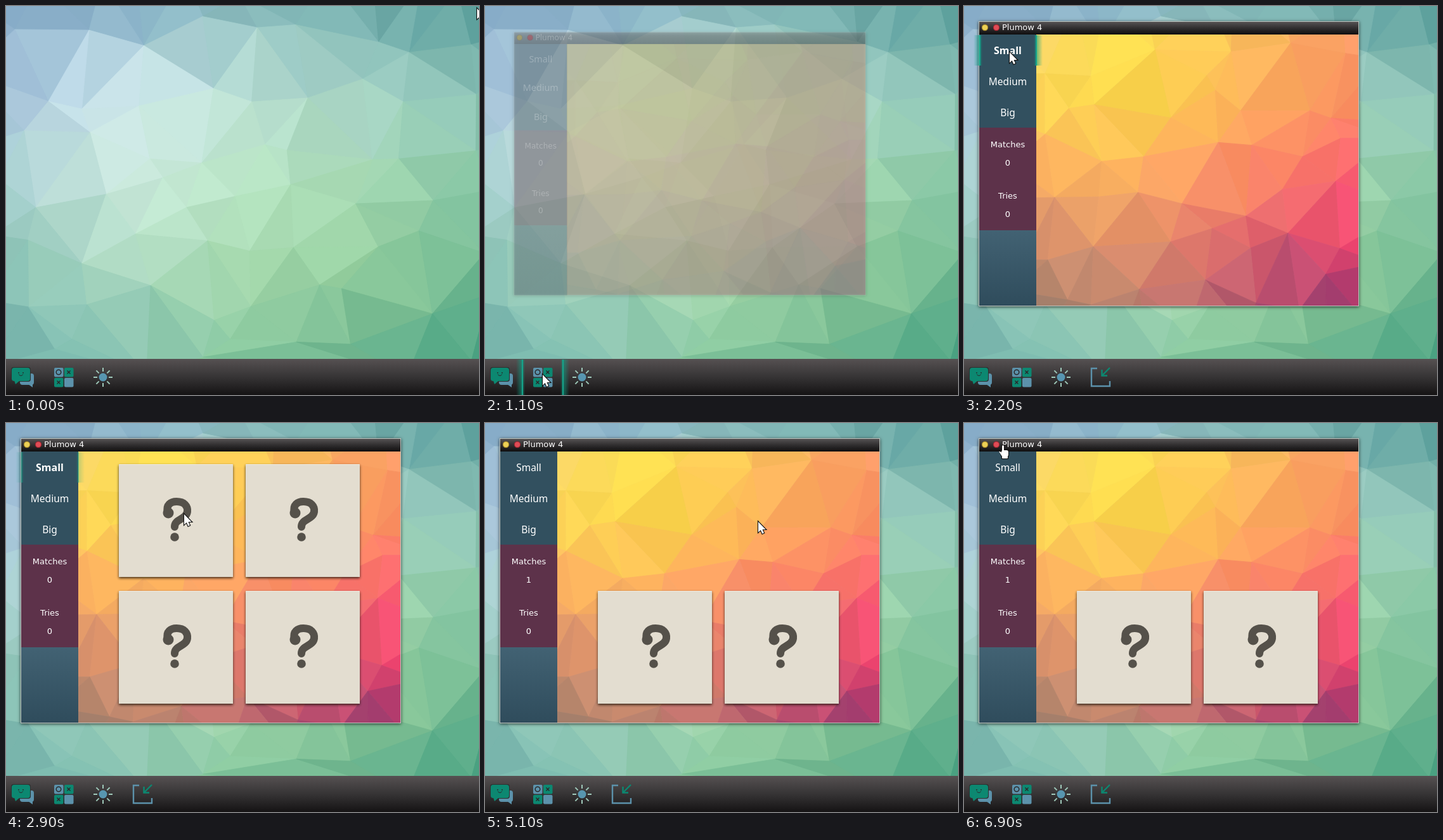
Write an HTML page with a canvas that moves like this. It is 746 px wide and 614 px high and loops after 7.2 s.

```html
<!DOCTYPE html>
<html lang="en">
<head>
<meta charset="utf-8">
<title>Card game on a desktop</title>
<style>
html, body { margin: 0; width: 100%; height: 100%; overflow: hidden; background: #222; }
canvas { display: block; }
</style>
</head>
<body>
<canvas id="stage" width="746" height="614"></canvas>
<script>
const LOOP = 7200, TAU = Math.PI * 2;
const GREEN = '#0c8871', BLUE = '#5c92ab', INK = '#2a292b', MARK = '#55514a';
let g = document.getElementById('stage').getContext('2d');

const clamp = v => Math.max(0, Math.min(1, v));
const mix = (a, b, k) => a + (b - a) * k;
const ramp = (t, a, b) => clamp((t - a) / (b - a));
const smooth = v => v * v * (3 - 2 * v);
const ease = (t, a, b) => smooth(ramp(t, a, b));

function random(seed) {
  return () => (seed = (seed * 16807) % 2147483647) / 2147483647;
}

// Runs a painter on a fresh canvas and returns that canvas.
function cache(w, h, paint) {
  const c = document.createElement('canvas'), old = g;
  c.width = w;
  c.height = h;
  g = c.getContext('2d');
  paint();
  g = old;
  return c;
}

function path(pts, close) {
  g.beginPath();
  for (let i = 0; i < pts.length; i += 2) g.lineTo(pts[i], pts[i + 1]);
  if (close) g.closePath();
}
function ink(color, width) {
  g.strokeStyle = color;
  g.lineWidth = width;
  g.stroke();
}
function line(pts, color, width) {
  path(pts);
  ink(color, width);
}
function poly(pts, color) {
  path(pts, true);
  g.fillStyle = color;
  g.fill();
}
function rect(x, y, w, h, color) {
  g.fillStyle = color;
  g.fillRect(x, y, w, h);
}
function round(x, y, w, h, r, color) {
  g.beginPath();
  g.roundRect(x, y, w, h, r);
  g.fillStyle = color;
  g.fill();
}
function arc(x, y, r, from = 0, to = TAU) {
  g.beginPath();
  g.arc(x, y, r, from, to);
}
function disc(x, y, r, color) {
  arc(x, y, r);
  g.fillStyle = color;
  g.fill();
}
function shadow(color, blur, dy) {
  g.shadowColor = color;
  g.shadowBlur = blur;
  g.shadowOffsetY = dy;
}
function fade(x0, y0, x1, y1, ...colors) {
  const f = g.createLinearGradient(x0, y0, x1, y1);
  colors.forEach((c, i) => f.addColorStop(i / (colors.length - 1), c));
  return f;
}
function text(str, x, y, font, align = 'center') {
  g.font = font;
  g.textAlign = align;
  g.fillStyle = '#fff';
  g.fillText(str, x, y);
}

// Low-poly picture: Delaunay triangles over a jittered grid, tinted by key colours.
function mesh(w, h, cell, keys, seed) {
  const grid = keys.map(r => r.split(' ').map(c => [0, 2, 4].map(i => parseInt(c.substr(i, 2), 16))));
  const rnd = random(seed), p = [];
  for (let y = -cell / 2; y < h + cell; y += cell)
    for (let x = -cell / 2; x < w + cell; x += cell)
      p.push([x + (rnd() - 0.5) * cell * 0.8, y + (rnd() - 0.5) * cell * 0.8]);

  function tint(x, y) {
    const u = clamp(x / w) * (grid[0].length - 1), v = clamp(y / h) * (grid.length - 1);
    const i = Math.min(Math.floor(u), grid[0].length - 2), j = Math.min(Math.floor(v), grid.length - 2);
    const light = (rnd() - 0.5) * 11;
    const channel = k => light + mix(
      mix(grid[j][i][k], grid[j][i + 1][k], u - i),
      mix(grid[j + 1][i][k], grid[j + 1][i + 1][k], u - i), v - j);
    return `rgb(${[0, 1, 2].map(k => Math.round(channel(k)))})`;
  }

  function face(a, b, c) {
    const d = 2 * (a[0] * (b[1] - c[1]) + b[0] * (c[1] - a[1]) + c[0] * (a[1] - b[1]));
    if (Math.abs(d) < 1) return;
    const [A, B, C] = [a, b, c].map(q => q[0] * q[0] + q[1] * q[1]);
    const ox = (A * (b[1] - c[1]) + B * (c[1] - a[1]) + C * (a[1] - b[1])) / d;
    const oy = (A * (c[0] - b[0]) + B * (a[0] - c[0]) + C * (b[0] - a[0])) / d;
    const r = (a[0] - ox) ** 2 + (a[1] - oy) ** 2 - 0.01;
    if (p.some(q => (q[0] - ox) ** 2 + (q[1] - oy) ** 2 < r)) return;
    const color = tint((a[0] + b[0] + c[0]) / 3, (a[1] + b[1] + c[1]) / 3);
    poly([...a, ...b, ...c], color);
    ink(color, 0.8);
  }

  return cache(w, h, () => {
    for (let i = 0; i < p.length; i++)
      for (let j = i + 1; j < p.length; j++)
        for (let k = j + 1; k < p.length; k++) face(p[i], p[j], p[k]);
  });
}

const desktop = mesh(746, 557, 86, [
  '86abc8 8eb6cc 86b8ba 74aeac 559a98',
  'acc9df d4ecf0 bfe3d8 a8d4c8 8cc2b6',
  'a8d0d0 cceade bae6c6 a6d9b2 86c6a4',
  '8ec6b8 b2dec6 a6daae 94cf9e 70b892',
  '70aea8 86c4b2 88c89e 6cb48e 46a080'
], 71);

const wallpaper = mesh(508, 428, 74, [
  'fcd966 fcdf52 fdcf58 fcb162 fc9c68',
  'fcd555 fcda4a fcc152 fca75e fd9063',
  'fcb062 fcb45c fd9c64 fd8468 fb5f72',
  'da936e e2946a e2786a e05a70 f24873',
  'a88470 b8806c c26c6c a84a70 a63e72'
], 29);

// Card faces are drawn around their own centre.
function mark() {
  g.lineCap = 'round';
  g.beginPath();
  g.moveTo(-13, -13);
  g.bezierCurveTo(-16, -25, -8, -30, 1, -30);
  g.bezierCurveTo(13, -30, 19, -23, 18, -14);
  g.bezierCurveTo(16, -1, -2, -3, -2, 10);
  ink(MARK, 12);
  disc(-12, -12, 8.5, MARK);
  disc(-2, 26, 6.8, MARK);
}

function leaf(angle, start, len, width) {
  const top = [], low = [];
  for (let i = 0; i <= 10; i++) {
    const half = width * Math.sin(Math.PI * (0.15 + i * 0.085)) * (i % 2 ? 0.5 : 1);
    const x = len * i / 10 + (i % 2 ? 0 : 4);
    top.push(x, -half);
    low.unshift(half);
    low.unshift(x);
  }
  g.save();
  g.rotate(angle);
  g.translate(start, 0);
  poly([...top, ...low], '#cfc7bc');
  ink(INK, 2);
  line([0, 0, len, 0], INK, 2);
  for (let i = 0; i < 12; i++) {
    const x = len * i / 13, h = width * 0.7 * Math.sin(Math.PI * (i + 1) / 14);
    line([x + 6, -h, x, 0, x + 6, h], INK, 1);
  }
  g.restore();
}

function petal(angle, rx, ry, size, rnd) {
  const sx = Math.cos(angle) * rx, sy = Math.sin(angle) * ry;
  g.save();
  g.translate(3 + sx, -18 + sy);
  g.rotate(Math.atan2(sy, sx));
  const pts = [];
  for (let i = 0; i < 22; i++) {
    const a = i / 22 * TAU, r = size * (0.9 + rnd() * 0.2);
    pts.push(Math.cos(a) * r * 0.8, Math.sin(a) * r);
  }
  poly(pts, '#d8d0c4');
  ink(INK, 1.7);
  for (let i = -5; i <= 5; i++) {
    const y = i / 6 * size;
    line([-size * 0.6, y * 0.5, size * (0.1 + rnd() * 0.4), y * 0.85], INK, 0.8);
  }
  g.restore();
}

function flower() {
  const rnd = random(97);
  g.lineJoin = 'round';
  g.save();
  g.translate(3, -18);
  leaf(3.1, 34, 44, 14);
  leaf(2.4, 34, 48, 16);
  leaf(1.05, 34, 58, 15);
  leaf(0.6, 34, 46, 15);
  g.restore();
  for (let ring = 0; ring < 4; ring++) {
    const spread = 1 - ring * 0.26, count = 9 - ring;
    for (let i = 0; i < count; i++)
      petal(i / count * TAU + ring * 0.5, 38 * spread, 28 * spread, 17 - ring * 3, rnd);
  }
}

function face(color, art) {
  return {
    color,
    art: cache(176, 174, () => {
      rect(0, 0, 176, 174, color);
      g.translate(88, 87);
      art();
    })
  };
}
const back = face('#e3ddd0', mark), front = face('#e6dfd5', flower);

// A card at centre x, y; turn 0 shows the back, 1 the front. It recedes while it turns.
function card(x, y, turn) {
  const side = turn < 0.5 ? back : front;
  const a = Math.PI * (turn < 0.5 ? turn : turn - 1);
  const depth = 1300, lift = Math.sin(Math.PI * turn);
  const project = u => {
    const k = depth / (depth + u * Math.sin(a) + 134 * lift);
    return [x + u * Math.cos(a) * k, k];
  };
  const [x0, k0] = project(-90), [x1, k1] = project(90);
  shadow(`rgba(30,20,10,${mix(0.85, 0.6, lift)})`, mix(4, 16, lift), 2);
  path([x0, y - 89 * k0, x1, y - 89 * k1, x1, y + 89 * k1, x0, y + 89 * k0], true);
  g.fillStyle = side.color;
  g.fill();
  shadow('transparent', 0, 0);
  line([x0 + 1, y - 88.5 * k0, x1 - 1, y - 88.5 * k1], '#f0ebe1', 1);
  if (!turn || turn === 1) return g.drawImage(side.art, x - 88, y - 87);
  for (let i = 0; i < 176; i++) {
    const [left, k] = project(i - 88), [right] = project(i - 87);
    g.drawImage(side.art, i, 0, 1, 174, left, y - 87 * k, right - left + 0.5, 174 * k);
  }
}

function glow(x0, x1, y, h, alpha) {
  if (alpha <= 0) return;
  g.save();
  g.globalAlpha = alpha;
  for (const [x, dir] of [[x0, -1], [x1, 1]]) {
    for (const reach of [10, -4]) {
      const end = x + dir * reach;
      rect(Math.min(x, end), y, Math.abs(reach), h, fade(x, 0, end, 0, 'rgba(12,160,132,.65)', 'rgba(12,160,132,0)'));
    }
    rect(x - 1, y, 2, h, '#16a48b');
  }
  g.restore();
}

function chatIcon() {
  round(22, 580, 22, 18, 4, BLUE);
  poly([35, 597, 42, 597, 42, 602], BLUE);
  round(8, 570, 31, 23, 4, '#302f30');
  round(9, 571, 29, 21, 4, GREEN);
  poly([13, 591, 22, 591, 15, 597], GREEN);
  disc(20, 579, 0.9, INK);
  disc(27, 579, 0.9, INK);
  arc(23.5, 580, 3.5, 0.4, 2.74);
  ink(INK, 1);
}

function gameIcon() {
  for (let i = 0; i < 4; i++) {
    const x = 76 + (i % 2) * 16, y = 571 + (i >> 1) * 16, cx = x + 7, cy = y + 7;
    const cross = i === 1 || i === 2;
    round(x, y, 14.5, 14.5, 2, cross ? GREEN : BLUE);
    if (cross) {
      line([cx - 2.5, cy - 2.5, cx + 2.5, cy + 2.5], INK, 1.5);
      line([cx + 2.5, cy - 2.5, cx - 2.5, cy + 2.5], INK, 1.5);
    } else if (!i) {
      arc(cx, cy, 3.8);
      ink(INK, 1.5);
    }
  }
}

function sunIcon() {
  disc(153, 586, 6.5, '#5796b0');
  for (let i = 0; i < 8; i++) {
    const c = Math.cos(i * TAU / 8), s = Math.sin(i * TAU / 8);
    line([153 + c * 9, 586 + s * 9, 153 + c * 15, 586 + s * 15], '#9fc9ba', 2);
  }
}

function restoreIcon() {
  line([210, 572, 201, 572, 201, 600, 230, 600, 230, 592], BLUE, 2.4);
  line([230, 571, 217.5, 583.5], GREEN, 2.4);
  line([217.5, 574, 217.5, 583.5, 226, 583.5], GREEN, 2.4);
}

function taskbar(t) {
  rect(0, 557, 746, 57, fade(0, 557, 0, 614, '#565152', '#363435', '#151314'));
  glow(59, 123, 558, 56, ramp(t, 800, 1100) * (1 - ramp(t, 1500, 2000)));
  chatIcon();
  gameIcon();
  sunIcon();
  if (t >= 1200) restoreIcon();
}

function sidebar(t) {
  const big = '"Noto Sans", sans-serif', small = '13px "DejaVu Sans", sans-serif';
  const hot = t >= 2000 && t < 3000;
  rect(24, 45, 90, 147, '#32505f');
  rect(24, 192, 90, 162, '#5d324a');
  rect(24, 354, 90, 119, fade(0, 354, 0, 473, '#426273', '#2f4c5c'));
  glow(25, 114, 46, 48, ramp(t, 2000, 2200) * (1 - ramp(t, 2650, 3050)));
  ['Small', 'Medium', 'Big'].forEach((s, i) =>
    text(s, 69, 76 + i * 49, `${hot && !i ? 'bold 16px' : '15.5px'} ${big}`));
  [['Matches', t < 3900 ? 0 : 1], ['Tries', 0]].forEach(([s, n], i) => {
    text(s, 69, 223 + i * 81, small);
    text(n, 69, 252 + i * 81, small);
  });
}

function cards(t) {
  for (let i = 0; i < 4; i++) {
    const start = 3050 + i * 800, top = i < 2;
    if (top && t >= 5000) continue;
    card(268 + (i % 2) * 200, 154 + (top ? 0 : 200), top ? ease(t, start, start + 750) : 0);
  }
}

function gameWindow(t) {
  const open = ease(t, 1000, 1300);
  if (!open) return;
  g.save();
  g.globalAlpha = open;
  g.translate(323, 249);
  g.scale(mix(0.9, 1, open), mix(0.9, 1, open));
  g.translate(-323, -249);

  shadow('rgba(0,0,0,.7)', 5, 1);
  rect(23, 24, 600, 450, '#bfc6c0');
  shadow('transparent', 0, 0);
  g.drawImage(wallpaper, 114, 45);
  rect(24, 25, 598, 20, fade(0, 25, 0, 45, '#555253', '#302e2f', '#0f0e0f'));
  for (const [x, color, rim] of [[33, '#ecd056', '#a98a2a'], [51, '#e04c56', '#a02632']]) {
    disc(x, 34, 5.2, rim);
    disc(x, 34, 4, color);
  }
  text('Plumow 4', 60, 38, '13px "DejaVu Sans", sans-serif', 'left');
  sidebar(t);
  if (t >= 2400) cards(t);
  g.restore();
}

// Pointer moves: start, end, x, y.
const moves = [
  [0, 500, 128, 453], [500, 900, 91, 582], [1300, 1500, 102, 453], [1500, 2000, 72, 73],
  [2600, 2900, 281, 144], [3500, 3800, 431, 156], [5800, 6500, 54, 34]
];

function arrow() {
  path([0, 0, 0, 16.5, 3.8, 13, 6.3, 18.7, 9, 17.5, 6.5, 12, 11.7, 12], true);
  ink('#111', 2.2);
  g.fillStyle = '#fff';
  g.fill();
}

function hand() {
  for (const [grow, color] of [[1, '#111'], [0, '#fff']]) {
    const part = (x, y, w, h, r) => round(x - grow, y - grow, w + 2 * grow, h + 2 * grow, r, color);
    part(6, 1, 3, 14, 1.5);
    part(5, 9, 11, 10, 3);
    part(6, 17, 9, 5, 1);
    poly([1 - grow, 11 - grow, 3, 11 - grow, 7, 14, 7, 20 + grow], color);
  }
}

function pointer(t) {
  let x = 743, y = 4;
  for (const [from, to, toX, toY] of moves) {
    const k = ease(t, from, to);
    x = mix(x, toX, k);
    y = mix(y, toY, k);
  }
  g.save();
  g.translate(x, y);
  if (t > 6000 && y < 45) hand();
  else arrow();
  g.restore();
}

// The picture moves in steps of 100 ms, with a few longer holds.
function step(ms) {
  const t = Math.min(6900, Math.floor(ms / 100) * 100);
  return t === 4700 || t === 4900 ? t - 100 : t;
}

function frame() {
  const t = step(performance.now() % LOOP);
  g.drawImage(desktop, 0, 0);
  taskbar(t);
  gameWindow(t);
  pointer(t);
  requestAnimationFrame(frame);
}
frame();
</script>
</body>
</html>
```
